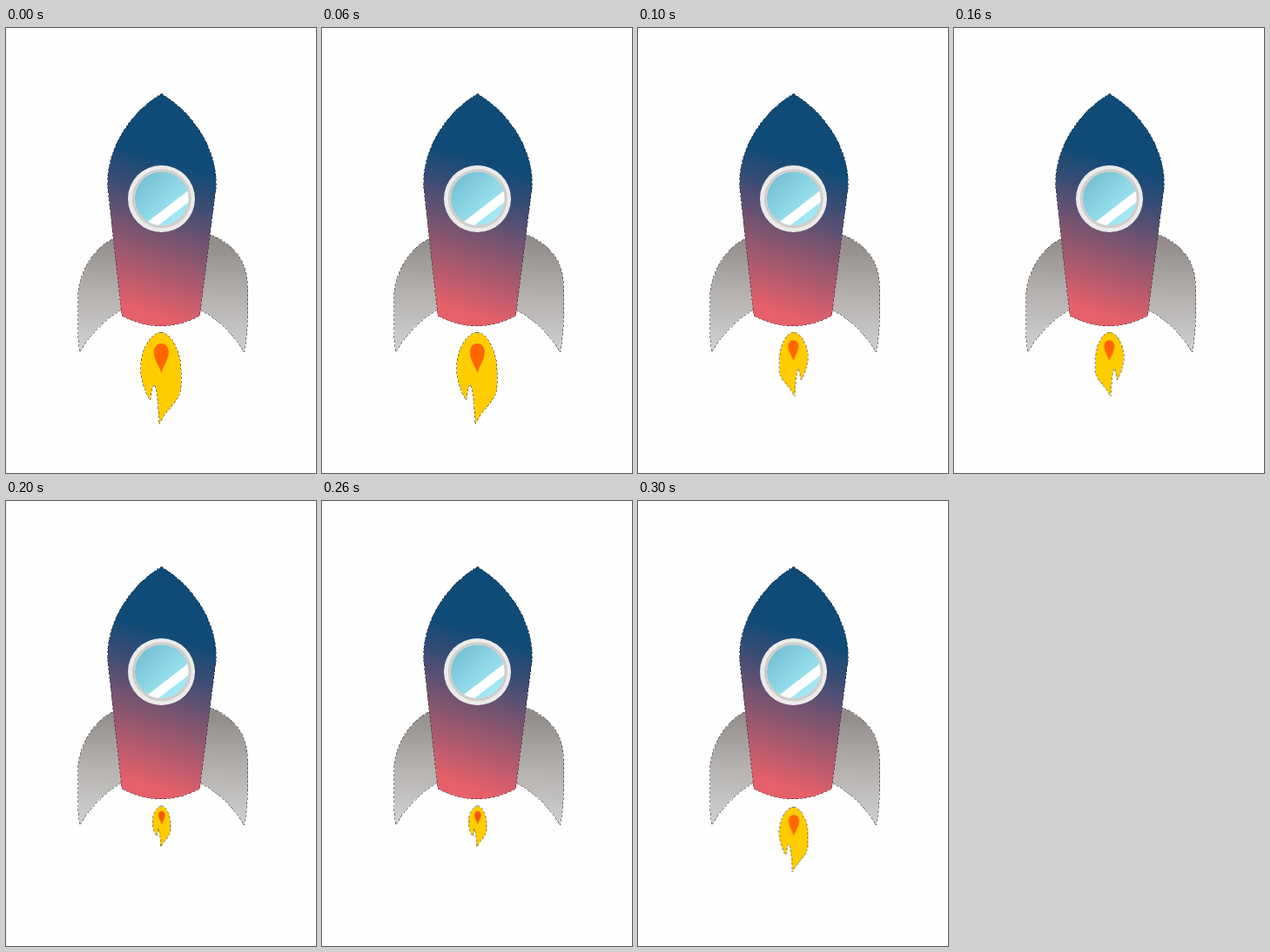
An HTML page without scripts for the animation above (0.4 s loop, 356 by 512 pixels).

```html
<!DOCTYPE html>
<html lang="en">
<head>
<meta charset="utf-8">
<title>Rocket</title>
<style>
  html, body { margin: 0; width: 100%; height: 100%; overflow: hidden; background: #fefefe; }
  svg { display: block; width: 100%; height: 100%; }
  .edge {
    stroke: #222; stroke-opacity: .65; stroke-width: .8; stroke-dasharray: 3 2;
    vector-effect: non-scaling-stroke; shape-rendering: crispEdges;
  }
  .flame { animation: flicker .4s step-end infinite; }
  .core { fill: #ff6600; animation: glow .4s step-end infinite; }

  /* The flame jumps between sizes and flips once per loop */
  @keyframes flicker {
    0%   { transform: translate(178px, 350px) scale(1); }
    25%  { transform: translate(178.5px, 350px) scale(-.7, .7); }
    50%  { transform: translate(178.7px, 351px) scale(.445); }
    75%, 100% { transform: translate(178.8px, 352px) scale(.71); }
  }
  @keyframes glow {
    50% { fill: #f2590f; }
    75% { fill: #ff6600; }
  }
</style>
</head>
<body>
<svg viewBox="0 0 356 512" preserveAspectRatio="none">
  <defs>
    <linearGradient id="hull" gradientUnits="userSpaceOnUse" x1="200" y1="157" x2="148" y2="323">
      <stop offset="0" stop-color="#0f4b76"/>
      <stop offset=".2" stop-color="#364c75"/>
      <stop offset=".5" stop-color="#7a5470"/>
      <stop offset="1" stop-color="#e5606a"/>
    </linearGradient>
    <linearGradient id="metal" gradientUnits="userSpaceOnUse" x1="180" y1="245" x2="176" y2="365">
      <stop offset="0" stop-color="#928d8b"/>
      <stop offset=".5" stop-color="#b3b0ae"/>
      <stop offset="1" stop-color="#cecdcc"/>
    </linearGradient>
    <linearGradient id="glass" x1=".1" y1=".2" x2=".8" y2=".9">
      <stop offset="0" stop-color="#76c2d6"/>
      <stop offset="1" stop-color="#a3ebf6"/>
    </linearGradient>
    <clipPath id="pane"><circle cx="178.8" cy="196.3" r="30.8"/></clipPath>
  </defs>

  <g fill="url(#metal)">
    <path class="edge" d="M126 241C107 249 87 270 82.500 305V340Q82.500 360 85 373C94 355 114 334 135 323Z"/>
    <path class="edge" d="M232 236.500C260 247 277.500 267 277.500 297V335Q277 356 273.500 373C261 352 243 334 220 323Z"/>
  </g>

  <path class="edge" fill="url(#hull)" d="M178.500 75.500C213 96 242 136 241.500 181L222.500 331Q178 355 133 331L116.500 181C116 136 144 96 178.500 75.500Z"/>

  <circle cx="178.500" cy="196.500" r="38.500" fill="#ebebea"/>
  <circle cx="178.800" cy="196.300" r="34" fill="#cfcecd"/>
  <g clip-path="url(#pane)">
    <circle cx="178.800" cy="196.300" r="30.800" fill="url(#glass)"/>
    <path fill="#fff" d="M160 225L212 185V198.500L170 231Z"/>
  </g>

  <g class="flame">
    <path class="edge" fill="#ffcc00" d="M0 0C11 0 23 22 23 43V62C23 80 5 88 -2 106C-3 88 -4 65 -8 60C-11 64 -11 72 -12.500 78C-19 68 -23.500 54 -23.500 40C-23.500 20 -11 0 0 0Z"/>
    <path class="core" d="M.3 13C5.300 13 8.800 17 8.800 23C8.800 32 2.300 39 .3 47C-1.700 39 -8.200 32 -8.200 23C-8.200 17 -4.700 13 .3 13Z"/>
  </g>
</svg>
</body>
</html>
```
